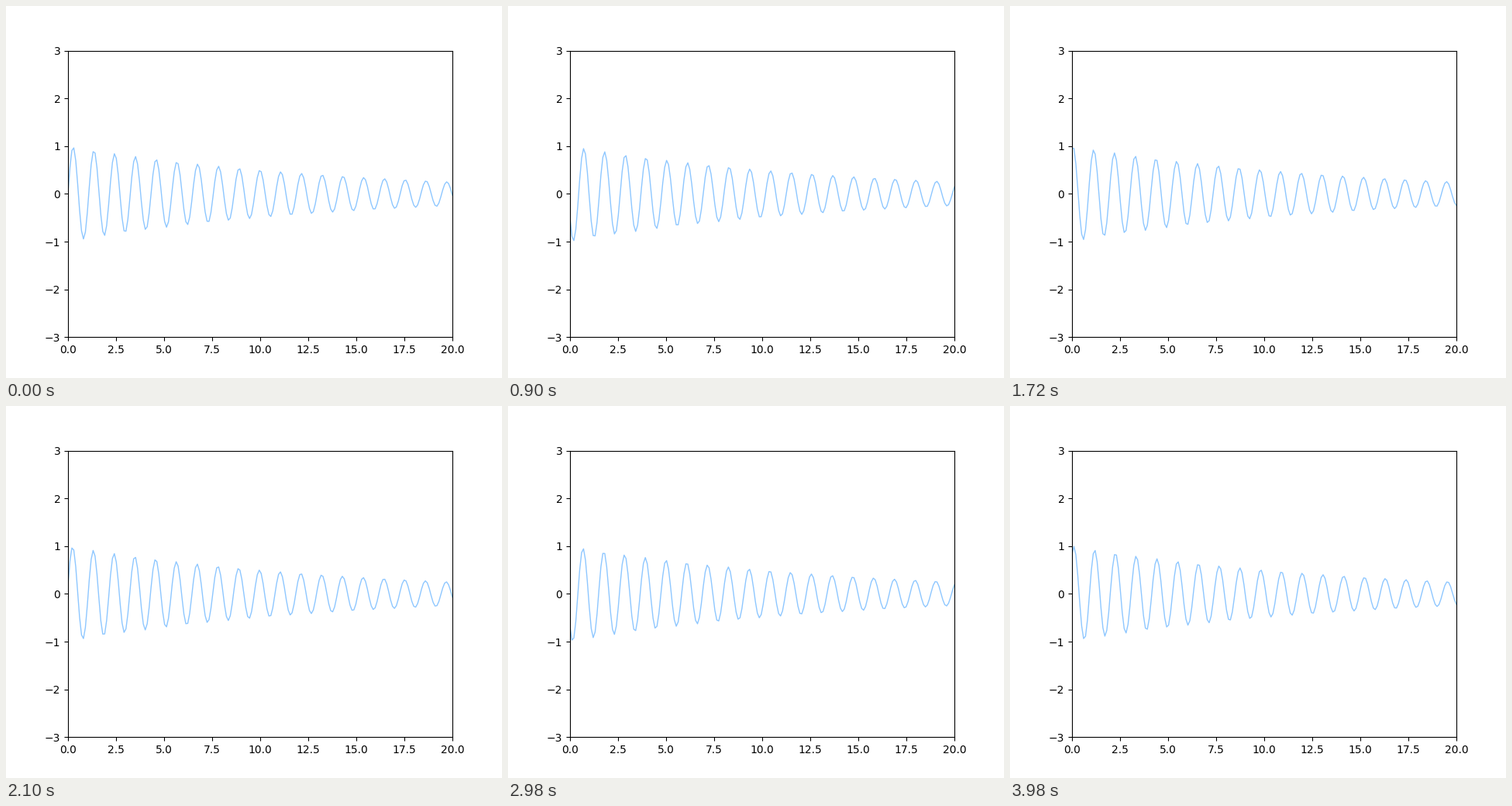
Recreate the animation shown at these times as a matplotlib script. Size 640 by 480 pixels, loop 4 s.

```python
import matplotlib.pyplot as plt
import numpy as np
from matplotlib.animation import FuncAnimation

FRAMES = 200
INTERVAL = 20        # ms
WAVELENGTH = 1.08
SPEED = 0.01         # x units per frame
DAMPING = 0.07

x = np.linspace(0, 20, 200)
envelope = np.exp(-DAMPING * x)


def wave(i):
    """Damped sine travelling to the right."""
    return envelope * np.sin(2 * np.pi * (x - SPEED * i) / WAVELENGTH)


fig, ax = plt.subplots(figsize=(6.4, 4.8), dpi=100)
ax.set(xlim=(0, 20), ylim=(-3, 3))
line, = ax.plot(x, wave(0), color="dodgerblue", alpha=0.5, lw=1)


def update(i):
    line.set_ydata(wave(i))
    return line,


anim = FuncAnimation(fig, update, frames=FRAMES, interval=INTERVAL,
                     repeat=True, repeat_delay=0)
plt.show()
```
